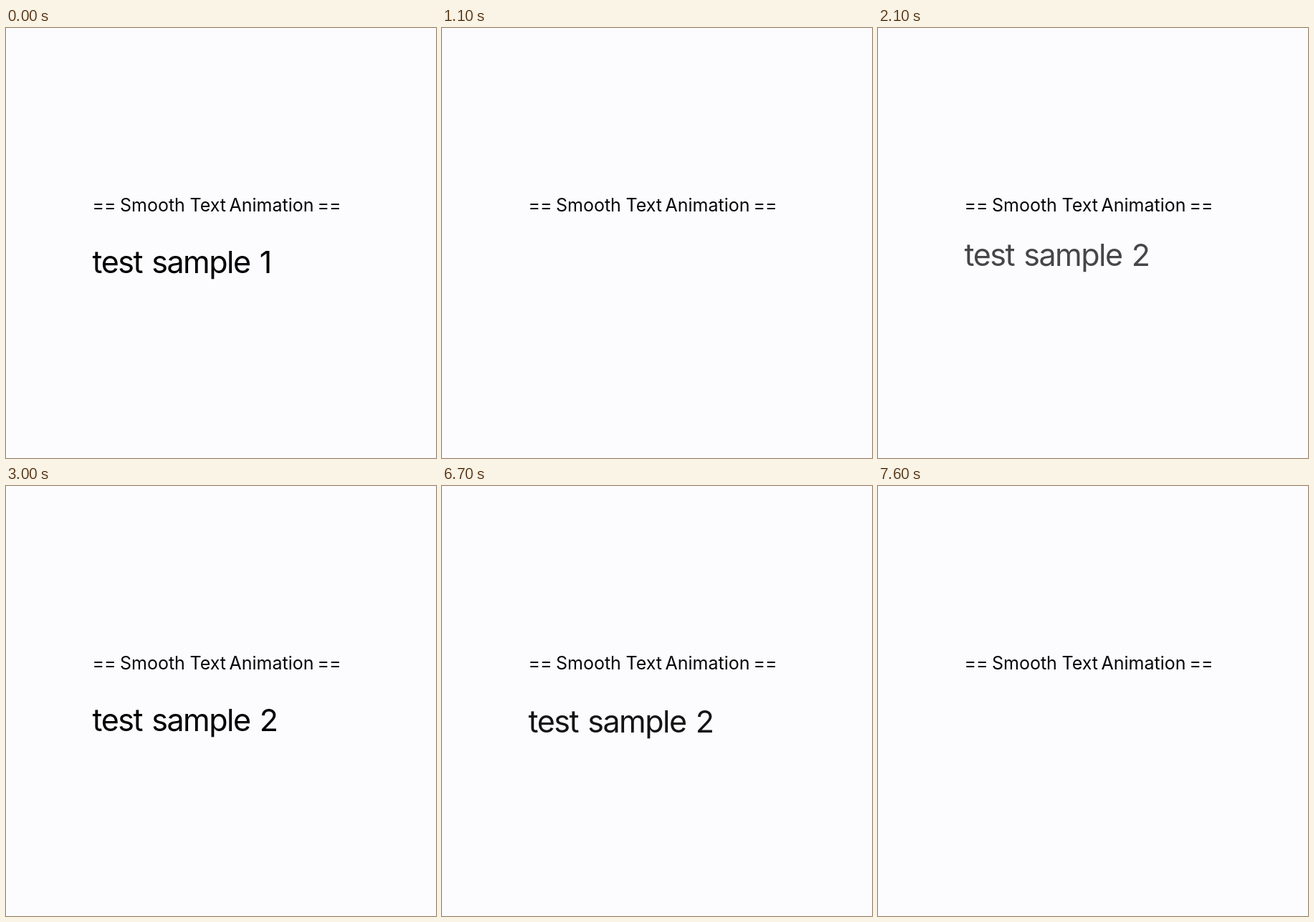
Write an HTML page that moves like this. It is 600x600 px and loops after 8000 ms.

```html
<!DOCTYPE html>
<html lang="en">
<head>
<meta charset="utf-8">
<title>Smooth Text Animation</title>
<style>
  html, body { margin: 0; width: 100%; height: 100%; overflow: hidden; background: #fcfbfe; }
  svg { display: block; width: 100%; height: 100%; }
  text { font-family: Inter, Roboto, sans-serif; font-optical-sizing: none; }
  .title { font-size: 25px; fill: #060608; }
  .sample { font-size: 43px; letter-spacing: -1.5px; fill: #000; }
</style>
</head>
<body>
<svg viewBox="0 0 600 600">
  <text class="title" y="256"><tspan x="120.5">== </tspan><tspan x="159">Smooth </tspan><tspan x="256.5">Text </tspan><tspan x="311.5">Animation </tspan><tspan x="434.5">==</tspan></text>
  <text class="sample" id="sample" y="341.5"><tspan x="120.5">test </tspan><tspan x="203.2">sample </tspan><tspan x="353.8" id="digit">1</tspan></text>
</svg>
<script>
  const LOOP = 8000, STEP = 100, SHIFT = 35;
  const sample = document.getElementById('sample');
  const digit = document.getElementById('digit');

  // Cubic ease-in-out with control points (.42, 0) and (.58, 1)
  function ease(x) {
    if (x <= 0) return 0;
    if (x >= 1) return 1;
    let lo = 0, hi = 1;
    for (let i = 0; i < 24; i++) {
      const s = (lo + hi) / 2, r = 1 - s;
      if (3 * r * r * s * 0.42 + 3 * r * s * s * 0.58 + s ** 3 < x) lo = s;
      else hi = s;
    }
    return lo * lo * (3 - 2 * lo);
  }

  const progress = (t, start, duration) => ease((t - start) / duration);

  function pose(t) {
    if (t < 1300) {
      const out = progress(t, 100, 1000);
      return { label: '1', y: out * SHIFT, opacity: 1 - out };
    }
    if (t < 4000) {
      const enter = progress(t, 1430, 1060);
      return { label: '2', y: (enter - 1) * SHIFT, opacity: enter };
    }
    const out = progress(t, 6500, 1000);
    return { label: '2', y: out * SHIFT, opacity: 1 - out };
  }

  function draw(time) {
    const t = Math.floor((time % LOOP) / STEP) * STEP;
    const { label, y, opacity } = pose(t);
    if (digit.textContent !== label) digit.textContent = label;
    sample.setAttribute('transform', `translate(0 ${y.toFixed(2)})`);
    sample.setAttribute('opacity', opacity.toFixed(3));
  }

  function tick() {
    draw(performance.now());
    requestAnimationFrame(tick);
  }
  tick();
</script>
</body>
</html>
```
